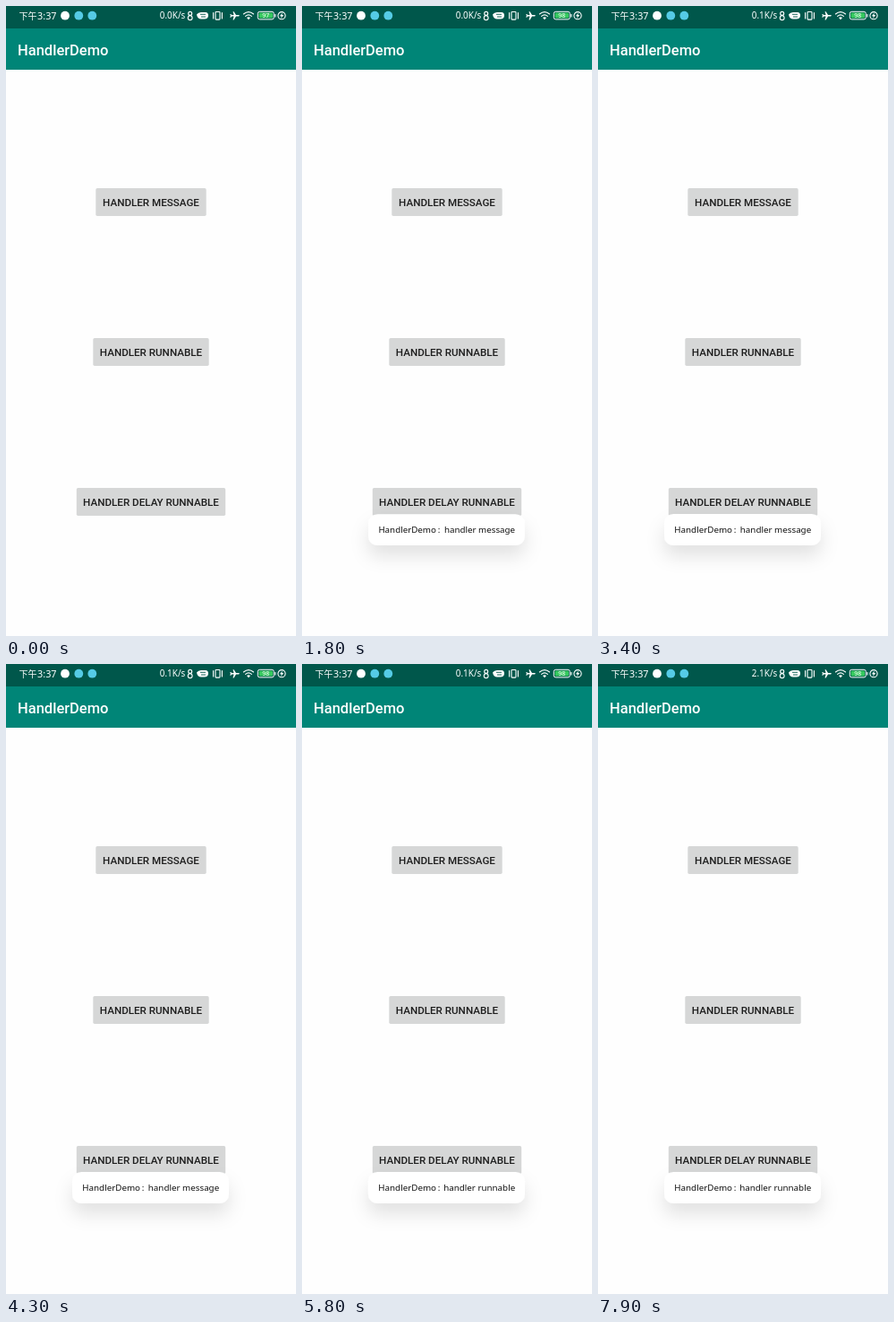
These frames come from a looping animation (324 px wide and 702 px high, 8000 ms). An HTML page:

```html
<!DOCTYPE html>
<html lang="zh">
<head>
<meta charset="utf-8">
<title>HandlerDemo</title>
<style>
  html, body { margin: 0; width: 100%; height: 100%; overflow: hidden; background: #fefefe; }
  svg { display: block; width: 100%; height: 100%; }
  text { font-family: Roboto, "Noto Sans", sans-serif; }
  .status { font-family: "Noto Sans", Roboto, sans-serif; font-weight: 500; fill: #fff; }
  .cjk { font-family: "Noto Sans CJK SC", "Noto Sans CJK", sans-serif; }
  .label { font-size: 11.63px; font-weight: 500; fill: #1e1e1e; text-anchor: middle; }
  .toast { font-family: "Noto Sans", "Open Sans", sans-serif; font-size: 9.8px; fill: #111; }
  .end { text-anchor: end; }
  .line { fill: none; stroke: #fff; stroke-width: 1.1; stroke-linecap: round; stroke-linejoin: round; }
</style>
</head>
<body>
<svg viewBox="0 0 324 702">
  <defs>
    <filter id="shadow" x="-30%" y="-60%" width="160%" height="300%">
      <feDropShadow dx="0" dy="12" stdDeviation="10" flood-color="#000" flood-opacity=".11"/>
    </filter>
  </defs>

  <rect width="324" height="702" fill="#fefefe"/>
  <rect width="324" height="25" fill="#00574b"/>
  <rect y="25" width="324" height="46" fill="#008577"/>
  <text x="13" y="54.8" font-size="16.5" font-weight="500" fill="#fff">HandlerDemo</text>

  <!-- status bar, left -->
  <text class="status cjk" x="14.5" y="14.6" font-size="10">下午</text>
  <text class="status end" x="56.5" y="14.8" font-size="10.8">3:37</text>
  <circle cx="66" cy="10.7" r="4.9" fill="#fff"/>
  <circle cx="81.3" cy="10.7" r="4.9" fill="#55cbe6"/>
  <circle cx="96.3" cy="10.7" r="4.9" fill="#55cbe6"/>

  <!-- status bar, right -->
  <text class="status end" id="speed" x="200.3" y="14.4" font-size="9.9">0.0K/s</text>
  <g class="line">
    <circle cx="205.7" cy="8.4" r="2"/>
    <circle cx="205.7" cy="13.2" r="2.4"/>
  </g>
  <path d="M213 9.5Q215 6.5 219 7H223Q226 7 226 10.5Q226 14.5 221.5 14.5H218Q214 14.5 213 9.5Z" fill="#fff"/>
  <path d="M217 9.3H223M218 12H223" stroke="#00574b" stroke-width=".9"/>
  <g class="line">
    <rect x="234" y="6.5" width="5" height="8.6" rx=".8"/>
    <path d="M231.6 7.5V14M241.4 7.5V14"/>
  </g>
  <path d="M261 10.8L260 10.1H257L254.6 6.2H253.5L254.6 10.1H252.2L251.2 8.9H250.3L250.9 10.8L250.3 12.7H251.2L252.2 11.5H254.6L253.5 15.4H254.6L257 11.5H260Z" fill="#fff"/>
  <g class="line">
    <path d="M265.4 9Q271 4.2 276.6 9M267.6 11.4Q271 8.4 274.4 11.4"/>
  </g>
  <path d="M269 13L271 15.3L273 13Q271 11.7 269 13Z" fill="#fff"/>
  <rect x="281.3" y="6.3" width="18" height="8.6" rx="2.2" fill="none" stroke="#fff"/>
  <rect x="282.6" y="7.6" width="15.4" height="6" rx="1" fill="#36c95f"/>
  <rect x="300.4" y="9" width="1.1" height="3.4" rx=".5" fill="#fff"/>
  <text class="status" id="charge" x="290.3" y="13.1" font-size="7" font-weight="700" text-anchor="middle">97</text>
  <circle class="line" cx="308" cy="10.7" r="4.1"/>
  <path d="M308.8 7.4L305.9 11.3H307.7L307.2 14L310.1 10.1H308.3Z" fill="#fff"/>

  <g id="buttons"></g>

  <g id="toast">
    <rect x="74" y="566" width="175" height="35" rx="10.5" fill="#fff" filter="url(#shadow)"/>
    <text class="toast" x="85.3" y="587.1">HandlerDemo</text>
    <text class="toast" x="151.7" y="587.1">:</text>
    <text class="toast end" id="note" x="238.2" y="587.1"></text>
  </g>
</svg>
<script>
const LOOP = 8000, STEP = 100;
const byId = id => document.getElementById(id);
const toast = byId('toast'), note = byId('note'), speed = byId('speed'), charge = byId('charge');

const buttons = [
  ['HANDLER MESSAGE', 203, 123.4],
  ['HANDLER RUNNABLE', 370, 129.4],
  ['HANDLER DELAY RUNNABLE', 537, 166.4]
];
byId('buttons').innerHTML = buttons.map(([label, y, w]) =>
  `<rect x="${162 - w / 2}" y="${y}" width="${w}" height="31" rx="1.7" fill="#d6d7d7"/>
   <text class="label" x="162" y="${y + 19.8}">${label}</text>`).join('');

const toasts = [
  { text: 'handler message', from: 1300, to: 4600 },
  { text: 'handler runnable', from: 4900, to: Infinity }
];
const clamp = v => Math.max(0, Math.min(1, v));
// damped spring: rises to 1 with a small overshoot
const spring = t => 1 - Math.exp(-0.012 * t) * Math.cos(0.01047 * t);

function draw(t) {
  charge.textContent = t < 400 ? '97' : '98';
  speed.textContent = (t < 2600 ? '0.0' : t < 7300 ? '0.1' : '2.1') + 'K/s';

  const cur = toasts.find(o => t > o.from && t < o.to);
  toast.style.display = cur ? '' : 'none';
  if (!cur) return;
  const p = spring(t - cur.from);
  const cy = 583.5 + (1 - p) * 90;
  note.textContent = cur.text;
  toast.setAttribute('opacity', Math.min(clamp((t - cur.from) / 120), clamp((cur.to - t) / 300)));
  toast.setAttribute('transform', `translate(161.5 ${cy}) scale(${p}) translate(-161.5 -583.5)`);
}

const start = performance.now();
function tick() {
  const t = (performance.now() - start) % LOOP;
  draw(Math.floor(t / STEP) * STEP);
  requestAnimationFrame(tick);
}
tick();
</script>
</body>
</html>
```
